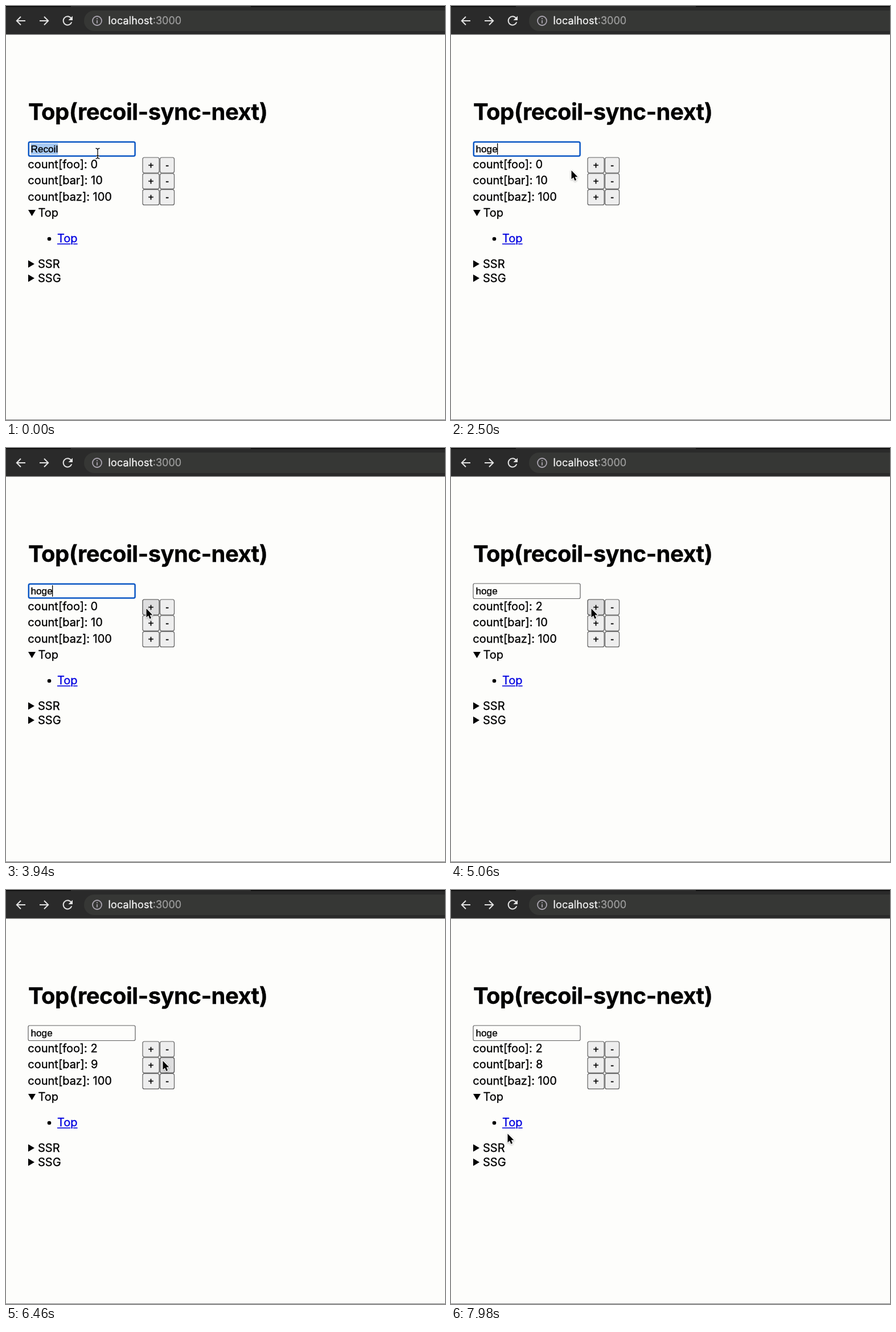
These frames come from a looping animation (771 by 727 pixels, 8000 ms). An HTML page with a canvas:

```html
<!DOCTYPE html>
<html lang="en">
<head>
<meta charset="utf-8">
<title>Counter demo</title>
<style>
  html, body { margin: 0; width: 100%; height: 100%; overflow: hidden; background: #fdfdfb; }
  canvas { display: block; }
</style>
</head>
<body>
<canvas id="stage" width="771" height="727"></canvas>
<script>
const ctx = document.getElementById('stage').getContext('2d');
const LOOP = 8000;
const PAGE = '#fdfdfb';
const UI = 'Inter, "Noto Sans", sans-serif';
const FORM = '"Liberation Sans", Arial, sans-serif';

// Latest value in a list of [start, value] steps
const stepAt = (steps, t) => steps.reduce((v, [at, next]) => t >= at ? next : v, steps[0][1]);

const typed = [[0, 'Recoil'], [800, 'h'], [1040, 'ho'], [1240, 'hog'], [1460, 'hoge']];
const foo = [[0, 0], [4080, 1], [4620, 2]];
const bar = [[0, 10], [6160, 9], [6520, 8]];
const hover = [[0, ''], [3480, '0+'], [5360, ''], [5500, '1-'], [7200, '']];
const TYPE_START = 800, TYPE_END = 1460, BLUR = 4030, MOVE_START = 2060;

// Pointer stops: time, x, y
const path = [
  [0, 161, 259], [2060, 161, 259], [2400, 207, 286], [2700, 219, 291],
  [3060, 225.5, 291], [3300, 238, 286], [3560, 246, 281], [5120, 246, 281],
  [5400, 262, 292], [5720, 275, 299], [6940, 275, 299], [7160, 260, 304],
  [7460, 196, 348], [7720, 124, 406], [7900, 99, 427], [8000, 99, 427]
];

function pointerAt(t) {
  const i = Math.max(1, path.findIndex(p => p[0] > t));
  const [t0, x0, y0] = path[i - 1], [t1, x1, y1] = path[i];
  const k = (t - t0) / (t1 - t0);
  return [x0 + (x1 - x0) * k, y0 + (y1 - y0) * k];
}

// A hairline stroke gives the text its slightly heavier look
function text(str, x, y, font, color = '#000', spacing = 0) {
  ctx.font = font;
  ctx.letterSpacing = spacing + 'px';
  ctx.fillStyle = ctx.strokeStyle = color;
  ctx.lineWidth = 0.35;
  ctx.fillText(str, x, y);
  ctx.strokeText(str, x, y);
  return ctx.measureText(str).width;
}

function rect(x, y, w, h, color) {
  ctx.fillStyle = color;
  ctx.fillRect(x, y, w, h);
}

function box(x, y, w, h, r, fill, stroke, line = 1) {
  ctx.beginPath();
  ctx.roundRect(x, y, w, h, r);
  ctx.fillStyle = fill;
  ctx.fill();
  if (!stroke) return;
  ctx.strokeStyle = stroke;
  ctx.lineWidth = line;
  ctx.stroke();
}

function shape(points, fill) {
  ctx.beginPath();
  points.forEach(([x, y]) => ctx.lineTo(x, y));
  ctx.closePath();
  ctx.fillStyle = fill;
  ctx.fill();
}

function strokePath(d, color, width) {
  ctx.strokeStyle = color;
  ctx.lineWidth = width;
  ctx.stroke(new Path2D(d));
}

function toolbar() {
  rect(0, 0, 771, 49, '#2a2a2a');
  rect(0, 0, 114, 1.5, '#060606');
  rect(430, 0, 341, 1.5, '#060606');
  box(137, 8, 660, 36, 18, '#363735');
  rect(0, 49, 771, 1.4, '#505050');

  const icon = '#e2e2e2';
  strokePath('M34 26H19M26 18.8L18.8 26L26 33.2', icon, 2);
  strokePath('M59 26H74M67 18.8L74.2 26L67 33.2', icon, 2);
  strokePath('M114.2 21.4A7.5 7.5 0 1 0 115.3 28.2', icon, 2);
  shape([[117, 17.5], [117, 25], [109.5, 25]], icon);

  const info = '#aaa5b0';
  strokePath('M168 26A8 8 0 1 1 152 26A8 8 0 1 1 168 26M160 25V30.4', info, 1.8);
  rect(159.1, 21.3, 1.8, 2, info);

  const w = text('localhost', 179.5, 32, '18px ' + UI, '#f0f0f0', 0.15);
  text(':3000', 179.5 + w, 32, '18px ' + UI, '#9b9b9b');
}

function input(t) {
  const focused = t < BLUR;
  if (focused) box(39.8, 238.8, 186.8, 24.8, 2.5, PAGE, '#0b57c4', 2.5);
  else box(39, 238, 188, 26.5, 2.5, PAGE, '#5f5f5f', 1.2);

  const value = stepAt(typed, t), font = '17.2px ' + FORM;
  ctx.font = font;
  ctx.letterSpacing = '0px';
  const w = ctx.measureText(value).width;
  if (t < TYPE_START) rect(43.5, 241, w, 20, '#a9cbf3');
  text(value, 43.5, 257, font);

  const typing = t >= TYPE_START && t < TYPE_END;
  const blinkOn = t >= TYPE_END && Math.floor((t - TYPE_END) / 500) % 2 === 0;
  if (focused && (typing || blinkOn)) rect(Math.round(43.5 + w) - 1, 241, 1.3, 20, '#000');
}

function button(label, x, y, w, active) {
  box(x + .5, y + .5, w - 1, 27, 3, active ? '#dededf' : '#eeeeee', active ? '#444' : '#606060', 1.2);
  ctx.textAlign = 'center';
  text(label, x + w / 2, y + 19, '17.2px ' + FORM);
  ctx.textAlign = 'left';
}

function counters(t) {
  const active = stepAt(hover, t);
  const rows = [['foo', stepAt(foo, t)], ['bar', stepAt(bar, t)], ['baz', 100]];
  rows.forEach(([name, n], i) => {
    text(`count[${name}]: ${n}`, 38.3, 285 + i * 28.3, '20px ' + UI);
    const y = 265.5 + i * 28.2;
    button('+', 239.5, y, 30, active === i + '+');
    button('-', 270, y, 26, active === i + '-');
  });
}

function link(str, x, y) {
  const font = '20px ' + UI, blue = '#0000e0';
  ctx.font = font;
  ctx.letterSpacing = '0px';
  rect(x, y + 2, ctx.measureText(str).width, 1.6, blue);
  ctx.strokeStyle = PAGE;
  ctx.lineWidth = 3;
  ctx.strokeText(str, x, y);
  text(str, x, y, font, blue);
}

function sections() {
  const font = '20px ' + UI;
  shape([[39, 358], [52, 358], [45.5, 369]], '#000');
  text('Top', 56.5, 370, font);
  ctx.beginPath();
  ctx.arc(76, 409, 3.3, 0, 7);
  ctx.fill();
  link('Top', 90, 415);
  [['SSR', 460], ['SSG', 485]].forEach(([name, y]) => {
    shape([[39, y - 13.5], [50, y - 7], [39, y - 0.5]], '#000');
    text(name, 56, y, font);
  });
}

function pointer(t) {
  if (t >= TYPE_START && t < MOVE_START) return;
  const [x, y] = pointerAt(t);
  ctx.save();
  ctx.translate(x, y);
  if (x < 227 && y < 265) {
    const beam = 'M-3.5 -9Q0 -9 0 -6V6Q0 9 -3.5 9M3.5 -9Q0 -9 0 -6M0 6Q0 9 3.5 9M-2.5 4H2.5';
    strokePath(beam, '#fff', 3.2);
    strokePath(beam, '#111', 1.4);
  } else {
    const arrow = new Path2D('M.5 1V16.4L4 13.2L6.4 19L9.1 17.8L6.7 12.2H11.4Z');
    ctx.lineJoin = 'round';
    ctx.shadowColor = 'rgba(0,0,0,.3)';
    ctx.shadowBlur = 3;
    ctx.shadowOffsetY = 1;
    ctx.strokeStyle = '#fff';
    ctx.lineWidth = 2.4;
    ctx.stroke(arrow);
    ctx.shadowColor = 'transparent';
    ctx.fillStyle = '#000';
    ctx.fill(arrow);
  }
  ctx.restore();
}

function draw(t) {
  rect(0, 0, 771, 727, PAGE);
  toolbar();
  text('Top(recoil-sync-next)', 39, 200, 'bold 40px ' + UI, '#000', -0.55);
  input(t);
  counters(t);
  sections();
  rect(0, 726, 771, 1, '#858585');
  pointer(t);
}

const start = performance.now();
function frame() {
  draw((performance.now() - start) % LOOP);
  requestAnimationFrame(frame);
}
frame();
</script>
</body>
</html>
```
